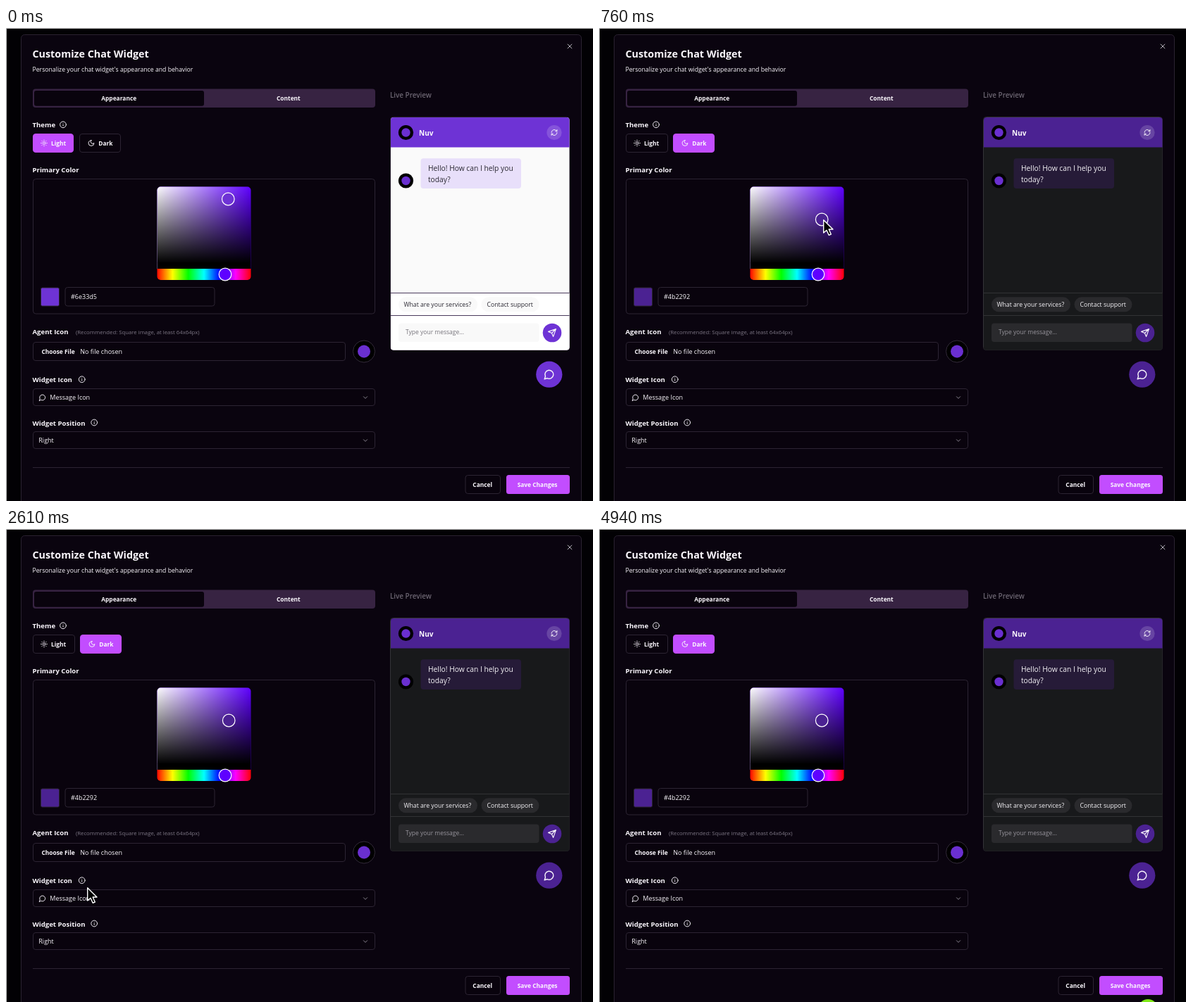
These frames come from a looping animation (833 px wide and 672 px high, 5.07 s). An HTML page:

```html
<!DOCTYPE html>
<html lang="en">
<head>
<meta charset="utf-8">
<title>Customize Chat Widget</title>
<style>
html, body { margin: 0; width: 100%; height: 100%; overflow: hidden; background: #020104; }
svg { display: block; }
#stage {
  --accent: #6e33d5; --panel: #fafafa; --footer: #fff; --field: #f9f9f9; --line: #4a3a5c; --edge: #2c2433;
  --bubble: #e8dffa; --ink: #2b2933; --hint: #77747c;
  font: 500 8.7px "Open Sans", "Noto Sans", sans-serif; fill: #fbf8fd;
}
#stage.dark {
  --panel: #18191b; --footer: #18191b; --field: #2a2a2d; --line: #323235; --edge: #343338;
  --bubble: #2d2044; --ink: #f4f2f6; --hint: #98959d;
}
#stage.deep { --accent: #4b2292; --bubble: #261b38; }
.accent { fill: var(--accent); }
.panel { fill: var(--panel); }
.footer { fill: var(--footer); }
.field { fill: var(--field); }
.bubble { fill: var(--bubble); }
.ink { fill: var(--ink); font-weight: 400; }
.dark .ink { font-weight: 500; }
.hint { fill: var(--hint); font-size: 8.5px; }
.rule { stroke: var(--line); }
.edge { fill: none; stroke: var(--edge); }
.box { fill: #09030d; stroke: #2c2433; }
.value { font-size: 9px; }
.bold { font-weight: 700; font-size: 8.4px; }
.label { font-weight: 700; font-size: 9.6px; }
.icon { fill: none; stroke: #f7f3fa; stroke-width: 2.2; stroke-linecap: round; stroke-linejoin: round; }
.pick { stroke: #fff; stroke-width: 1.2; }
.btn rect { fill: #09030d; stroke: #2c2433; }
.btn.hover rect { fill: #372342; }
.btn.on rect { fill: #c24dff; stroke: #c24dff; }
.btn.on.hover rect { fill: #b048e4; stroke: #b048e4; }
.cursor { fill: #000; stroke: #fff; stroke-width: 1.4; stroke-linejoin: round; }
</style>
</head>
<body>
<svg id="stage" width="833" height="672" viewBox="0 0 833 672">
  <defs>
    <linearGradient id="white"><stop stop-color="#fff"/><stop offset="1" stop-color="#fff" stop-opacity="0"/></linearGradient>
    <linearGradient id="black" x2="0" y2="1"><stop stop-opacity="0"/><stop offset="1"/></linearGradient>
    <linearGradient id="hues"></linearGradient>
    <clipPath id="pickerClip"><rect x="214.5" y="225.5" width="133" height="132.5" rx="5"/></clipPath>
    <clipPath id="chatClip"><rect x="546" y="127" width="253.500" height="330.500" rx="4"/></clipPath>
    <g id="sun"><circle cx="12" cy="12" r="4"/><path d="M12 2v2M12 20v2M4.9 4.9l1.4 1.4M17.7 17.7l1.4 1.4M2 12h2M20 12h2M6.3 17.7l-1.4 1.4M19.1 4.9l-1.4 1.4"/></g>
    <path id="moon" d="M12 3a6 6 0 0 0 9 9 9 9 0 1 1-9-9Z"/>
    <g id="info"><circle cx="12" cy="12" r="10"/><path d="M12 16v-4M12 8h.01"/></g>
    <path id="message" d="M7.9 20A9 9 0 1 0 4 16.1L2 22Z"/>
    <path id="chevron" d="m6 9 6 6 6-6"/>
    <path id="send" d="m22 2-7 20-4-9-9-4ZM22 2 11 13"/>
    <path id="refresh" d="M3 12a9 9 0 0 1 9-9 9.75 9.75 0 0 1 6.74 2.74L21 8M21 3v5h-5M21 12a9 9 0 0 1-9 9 9.75 9.75 0 0 1-6.74-2.74L3 16M8 16H3v5"/>
    <path id="close" d="M5 5l14 14M19 5 5 19"/>
  </defs>

  <path d="M0 .5H833M.5 0V672" stroke="#c4c4c4"/>
  <rect x="21.5" y="9.5" width="795" height="680" rx="5" fill="#0a040f" stroke="#2a2230"/>
  <text x="37.5" y="42.3" font-size="14.3" font-weight="700">Customize Chat Widget</text>
  <text x="37.5" y="62">Personalize your chat widget's appearance and behavior</text>

  <rect x="38" y="86.5" width="486" height="26.5" rx="4" fill="#372342"/>
  <rect x="40" y="89" width="241" height="21.8" rx="3" fill="#09030d"/>
  <text class="bold" x="135.3" y="103">Appearance</text>
  <text class="bold" x="384" y="103">Content</text>

  <text class="label" x="37.5" y="141.2">Theme</text>
  <g id="lightBtn" class="btn"><rect x="38.5" y="150.5" height="26" rx="3.5"/><text class="bold" x="64" y="167">Light</text></g>
  <g id="darkBtn" class="btn"><rect x="104.5" y="150.5" width="58" height="26" rx="3.5"/><text class="bold" x="131.2" y="167">Dark</text><g id="moonSlot"></g></g>

  <text class="label" x="37.5" y="204.7">Primary Color</text>
  <rect class="box" x="38.5" y="214.5" width="485" height="191.5" rx="4"/>
  <g clip-path="url(#pickerClip)">
    <rect x="214" y="225" width="134" height="117" fill="#5e00ff"/>
    <rect x="214" y="225" width="134" height="117" fill="url(#white)"/>
    <rect x="214" y="225" width="134" height="109" fill="url(#black)"/>
    <rect x="214" y="333.8" width="134" height="8.2" fill="#000"/>
    <rect x="214" y="342" width="134" height="17" fill="url(#hues)"/>
  </g>
  <circle id="shade" class="accent pick" r="8.8"/>
  <circle class="pick" cx="311" cy="350" r="8.8" fill="#5e00ff"/>
  <rect class="accent" x="49.5" y="369" width="26" height="26" rx="2" stroke="#2c2433"/>
  <rect class="box" x="84" y="368.5" width="212" height="26.5" rx="3.5"/>
  <text id="hex" class="value" x="92" y="385.4"></text>

  <text class="label" x="37.5" y="435">Agent Icon</text>
  <text x="99" y="435" font-size="7.76" font-weight="400" fill="#7d7785">(Recommended: Square image, at least 64x64px)</text>
  <rect class="box" x="38.5" y="446.5" width="443" height="26" rx="3.5"/>
  <text class="bold" x="50.5" y="463">Choose File</text>
  <text class="value" x="105.3" y="463">No file chosen</text>
  <circle cx="508" cy="459.5" r="15.5" stroke="#332a3a" fill="#000"/>
  <circle cx="508" cy="459.5" r="9" fill="#6a2fd0"/>

  <text class="label" x="37.5" y="503">Widget Icon</text>
  <rect class="box" x="38.5" y="512.5" width="485" height="24" rx="3.5"/>
  <text class="value" x="62.3" y="528">Message Icon</text>
  <text class="label" x="37.5" y="564.5">Widget Position</text>
  <rect class="box" x="38.5" y="573.5" width="485" height="24" rx="3.5"/>
  <text class="value" x="46.3" y="588.6">Right</text>

  <path d="M38 624.5H800" stroke="#2c2433"/>
  <rect class="box" x="652" y="635.5" width="49.5" height="26" rx="3.5"/>
  <text class="bold" x="662.3" y="652.2">Cancel</text>
  <rect x="710" y="635" width="90" height="27" rx="3.5" fill="#c24dff"/>
  <text class="bold" x="725.7" y="652.2">Save Changes</text>

  <text x="545" y="99" font-size="9.87" font-weight="600" fill="#6c6672">Live Preview</text>
  <rect class="edge" x="545.5" y="126.5" width="254" height="331" rx="4"/>
  <g clip-path="url(#chatClip)">
    <rect class="panel" x="546" y="127" width="254" height="331"/>
    <rect class="accent" x="546" y="127" width="254" height="42.5"/>
    <rect class="footer" x="546" y="376" width="254" height="82"/>
    <path class="rule" d="M546 376.5H800M546 408.5H800"/>
  </g>
  <g id="avatars"></g>
  <text x="586" y="153" font-size="10" font-weight="700">Nuv</text>
  <circle cx="778" cy="148.5" r="10.6" fill="#fff" fill-opacity=".16"/>
  <rect class="bubble" x="588.5" y="185.3" width="142.5" height="42.7" rx="4"/>
  <g class="ink" font-size="10.27"><text x="599" y="203">Hello! How can I help you</text><text x="599" y="219.2">today?</text></g>
  <rect class="field" x="557" y="382.3" width="112" height="21" rx="10.5"/>
  <rect class="field" x="674.5" y="382.3" width="82" height="21" rx="10.5"/>
  <g class="ink"><text x="564.5" y="396.3">What are your services?</text><text x="682.5" y="396.3">Contact support</text></g>
  <rect class="field" x="557" y="419.5" width="199.5" height="26.5" rx="4"/>
  <text class="hint" x="567" y="435">Type your message...</text>
  <circle class="accent" cx="775" cy="433" r="13.3"/>
  <circle class="accent" cx="770.8" cy="492.2" r="18.6"/>

  <g id="icons"></g>
  <circle id="dot" cx="779" cy="682" r="14" fill="#7fe817"/>
  <path id="arrow" class="cursor" d="M.7 .8V19L5 15.200L8.200 22.300L11.300 21L8.200 14H14Z"/>
  <g id="hand" class="cursor">
    <path d="M6 16V3a2 2 0 0 1 4 0V11a2 2 0 0 1 3.600 .6a2 2 0 0 1 3.400 .8a1.800 1.800 0 0 1 3 1.400V19q0 3-2 5V27H8.500V25L1.600 17.600a1.800 1.800 0 0 1 2.600-2.400Z"/>
    <path d="M10 11v4M13.600 12v3.500M17 13v3" stroke-width="1"/>
  </g>
</svg>
<script>
const LOOP = 5070;
const $ = id => document.getElementById(id);

const icon = (name, x, y, size, color = '#f7f3fa') =>
  `<use href="#${name}" class="icon" style="stroke:${color}" transform="translate(${x - size / 2} ${y - size / 2}) scale(${size / 24})"/>`;

$('icons').innerHTML = [
  icon('close', 800, 26, 10, '#c9c3ce'),
  icon('info', 81, 137.3, 10.5), icon('info', 107.7, 499.2, 10.5), icon('info', 125.2, 560.5, 10.5),
  icon('sun', 54, 163.5, 10.5),
  icon('message', 51.7, 525, 10.5),
  icon('chevron', 510, 525, 10.5, '#8d8693'), icon('chevron', 510, 586, 10.5, '#8d8693'),
  icon('refresh', 778, 148.5, 10.5), icon('send', 775, 433, 13), icon('message', 770.8, 492.2, 16)
].join('');
$('moonSlot').innerHTML = icon('moon', 121, 163.5, 10.5);
$('avatars').innerHTML = [148.5, 217].map(y =>
  `<circle cx="567.5" cy="${y}" r="10.6" fill="#000"/><circle cx="567.5" cy="${y}" r="6.2" fill="#6a2fd0"/>`).join('');
$('hues').innerHTML = Array.from({ length: 7 }, (_, i) =>
  `<stop offset="${i / 6}" stop-color="hsl(${i * 60},100%,50%)"/>`).join('');

// Pointer steps: start time, shape, left, top.
const pointer = [
  [0, ''], [70, 'arrow', 139, 238], [140, 'hand', 142, 175], [760, 'arrow', 318, 272],
  [1590, 'arrow', 106, 456], [1660, 'arrow', 104, 456], [1730, 'arrow', 103, 455], [1870, 'arrow', 105, 455], [2000, 'arrow', 106, 454],
  [2400, 'arrow', 107, 460], [2470, 'arrow', 111, 476], [2540, 'arrow', 114, 495], [2610, 'arrow', 115, 509],
  [2670, 'hand', 117, 517], [2740, 'hand', 117, 520], [2800, 'hand', 115, 520], [2870, 'hand', 113, 521], [2940, 'hand', 114, 523],
  [3600, 'hand', 124, 533], [3670, 'arrow', 140, 545], [3740, 'arrow', 142, 556], [3800, 'arrow', 140, 566],
  [3870, 'hand', 133, 573], [3940, 'hand', 130, 575], [4070, 'hand', 128, 575], [4210, 'hand', 129, 575], [4870, '']
];

function draw(t) {
  const dark = t >= 470, deep = t >= 760;
  $('stage').classList.toggle('dark', dark);
  $('stage').classList.toggle('deep', deep);

  $('lightBtn').classList.toggle('on', !dark);
  $('lightBtn').firstElementChild.setAttribute('width', dark ? 59 : 57);
  $('darkBtn').classList.toggle('on', dark);
  $('darkBtn').classList.toggle('hover', t >= 140 && !deep);
  $('darkBtn').setAttribute('transform', `translate(${dark ? 1 : 0})`);

  $('shade').setAttribute('cx', deep ? 316.2 : 315.3);
  $('shade').setAttribute('cy', deep ? 272 : 243);
  $('hex').textContent = deep ? '#4b2292' : '#6e33d5';

  const [, shape, x, y] = pointer.findLast(step => step[0] <= t);
  for (const name of ['arrow', 'hand']) {
    $(name).style.display = name === shape ? '' : 'none';
    if (name === shape) $(name).setAttribute('transform', `translate(${x} ${y})`);
  }
  $('dot').style.display = t >= 4940 ? '' : 'none';
}

const start = performance.now();
function tick() {
  draw((performance.now() - start) % LOOP);
  requestAnimationFrame(tick);
}
tick();
</script>
</body>
</html>
```
